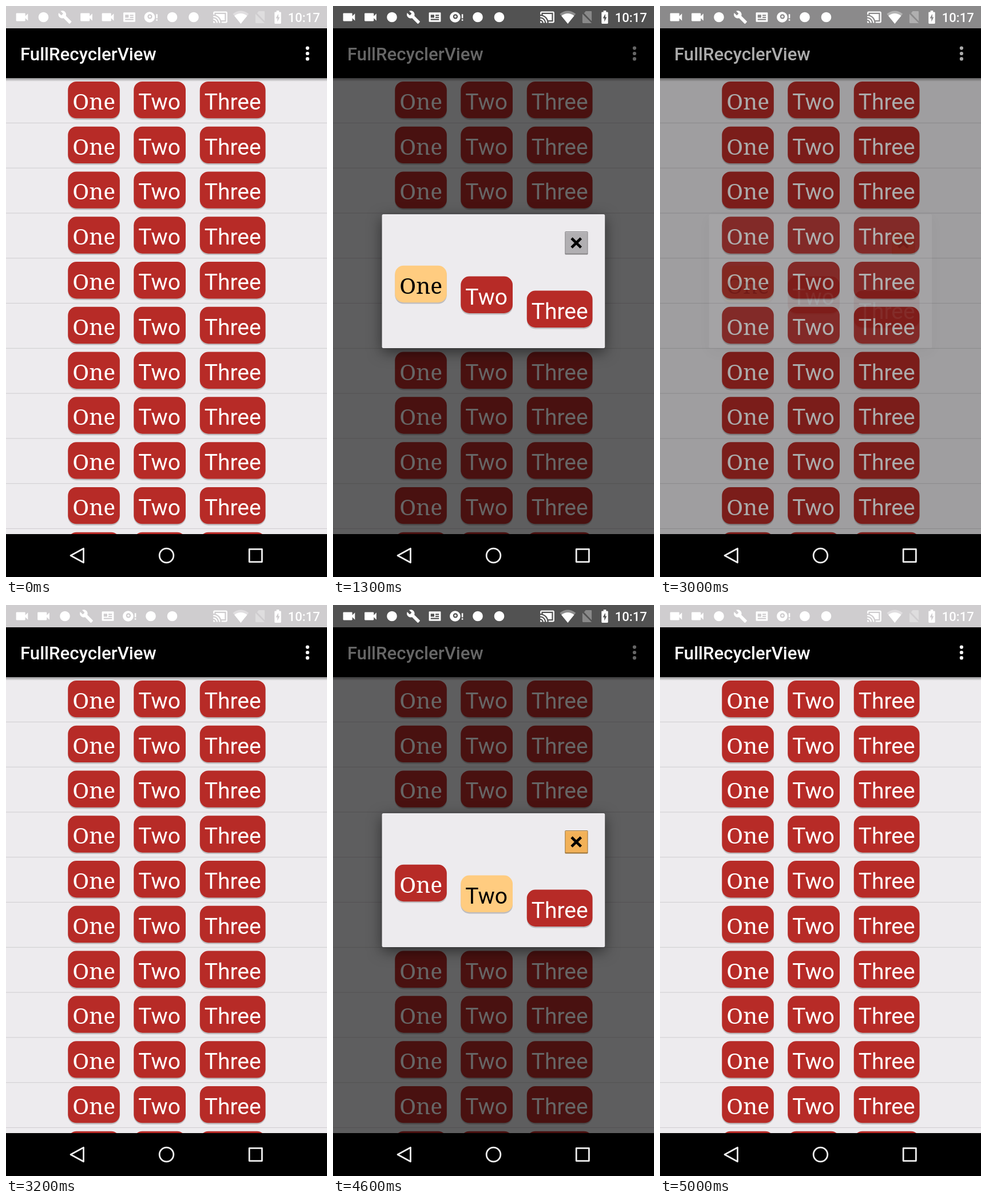
Write an HTML page with a canvas that moves like this. It is 561 px wide and 998 px high and loops after 5100 ms.

```html
<!DOCTYPE html>
<html lang="en">
<head>
<meta charset="utf-8">
<title>FullRecyclerView</title>
<style>
html, body { margin: 0; width: 100%; height: 100%; overflow: hidden; background: #000; }
canvas { display: block; }
</style>
</head>
<body>
<canvas id="stage" width="561" height="998"></canvas>
<script>
const W = 561, H = 998, LOOP = 5100, STEP = 100;
const BAR_TOP = 39, LIST_TOP = 126, NAV_TOP = 923, PITCH = 78.78;
const SANS = 'Roboto, sans-serif', SERIF = '"Noto Serif", serif';
const RED = '#b72b27', DARK_RED = '#781b1a', AMBER = '#ffcc80', PAPER = '#edebee';

const view = document.getElementById('stage').getContext('2d');
const layerCanvas = document.createElement('canvas');
layerCanvas.width = W;
layerCanvas.height = H;
const layer = layerCanvas.getContext('2d');

const BUTTONS = [
  { label: 'One', x: 108.3, w: 90.5, font: SERIF, drop: 454 },
  { label: 'Two', x: 223.3, w: 90.7, font: SANS, drop: 472.8 },
  { label: 'Three', x: 338.8, w: 114.7, font: SANS, drop: 497.8 }
];

// Each visit: button pressed, dialog opening, close button pressed, dialog leaving
const VISITS = [
  { pick: 0, press: 600, open: 636, close: 2900, leave: 2910 },
  { pick: 1, press: 3800, open: 3800, close: 4600, leave: 4610 }
];
const PRESSED_ROW = 3, DIM = 0.6, DIM_MS = 200, FADE_MS = 150;

const PATHS = {
  camera: 'M17 10.5V7c0-.55-.45-1-1-1H4c-.55 0-1 .45-1 1v10c0 .55.45 1 1 1h12c.55 0 1-.45 1-1v-3.5l4 4v-11l-4 4z',
  wrench: 'M22.7 19l-9.1-9.1c.9-2.3.4-5-1.5-6.9-2-2-5-2.4-7.4-1.3L9 6 6 9 1.6 4.7C.4 7.1.9 10.1 2.9 12.1c1.9 1.9 4.6 2.4 6.9 1.5l9.1 9.1c.4.4 1 .4 1.4 0l2.3-2.3c.5-.4.5-1.1.1-1.4z',
  card: 'M3 4h18q1 0 1 1v14q0 1-1 1H3q-1 0-1-1V5q0-1 1-1zM5 8v5h6V8zM13 8v2h6V8zM13 11.5v2h6v-2zM5 15v2h14v-2z',
  disc: 'M1 12a9 9 0 1 0 18 0a9 9 0 1 0-18 0zM6.5 11a4 4 0 1 0 8 0a4 4 0 1 0-8 0zM8.7 11a1.8 1.8 0 1 0 3.6 0a1.8 1.8 0 1 0-3.6 0zM21 7h2.4v7H21zM21 15.5h2.4v2.4H21z',
  dot: 'M3.5 12a8.5 8.5 0 1 0 17 0a8.5 8.5 0 1 0-17 0z',
  cast: 'M1 18v3h3c0-1.66-1.34-3-3-3zm0-4v2c2.76 0 5 2.24 5 5h2c0-3.87-3.13-7-7-7zm0-4v2c4.97 0 9 4.03 9 9h2c0-6.08-4.93-11-11-11zm20-7H3c-1.1 0-2 .9-2 2v3h2V5h18v14h-7v2h7c1.1 0 2-.9 2-2V5c0-1.1-.9-2-2-2zM19 7H5v1.63c3.96 1.28 7.09 4.41 8.37 8.37H19z',
  wifi: 'M12 22L0 7Q12-2 24 7z',
  sim: 'M10 3h8q1 0 1 1v14L7.5 6zM5 7l14 14H6q-1 0-1-1z',
  battery: 'M10 2h4v2h2q1 0 1 1v16q0 1-1 1H8q-1 0-1-1V5q0-1 1-1h2zM12.8 7L9 13.8h2.4V19l3.6-7h-2.2z'
};
for (const name in PATHS) PATHS[name] = new Path2D(PATHS[name]);

const EARLY = ['camera', 'dot', 'wrench', 'camera', 'camera', 'card', 'disc', 'dot', 'dot'];
const LATER = ['camera', 'camera', 'dot', 'wrench', 'card', 'disc', 'dot', 'dot'];

const clamp = v => Math.min(1, Math.max(0, v));
const easeOut = v => 1 - (1 - clamp(v)) ** 3;

function box(c, x, y, w, h, r, fill) {
  c.fillStyle = fill;
  c.beginPath();
  c.roundRect(x, y, w, h, r);
  c.fill();
}

function text(c, str, x, y, font, color) {
  c.font = font;
  c.fillStyle = color;
  c.fillText(str, x, y);
}

function icon(c, name, x, y, scale, alpha = 1) {
  c.save();
  c.globalAlpha = alpha;
  c.fillStyle = '#fff';
  c.translate(x, y);
  c.scale(scale, scale);
  c.translate(-12, -12);
  c.fill(PATHS[name], 'evenodd');
  c.restore();
}

function button(c, b, y, fill, ink) {
  box(c, b.x, y + 2.6, b.w, 64.2, 15, 'rgba(0,0,0,.2)');
  box(c, b.x, y, b.w, 64.4, 15, fill);
  text(c, b.label, b.x + 7.9, y + 49, '39px ' + b.font, ink);
}

function drawList(c, pressed) {
  c.fillStyle = PAPER;
  c.fillRect(0, LIST_TOP, W, NAV_TOP - LIST_TOP);
  for (let row = 0; row <= 10; row++) {
    const top = LIST_TOP + row * PITCH;
    BUTTONS.forEach((b, i) => {
      const down = row === PRESSED_ROW && i === pressed;
      button(c, b, top + 5.9, down ? DARK_RED : RED, '#fff');
    });
    c.fillStyle = '#d1cfd2';
    c.fillRect(0, top + PITCH - 0.9, W, 1.1);
  }
}

function drawBars(c) {
  c.fillStyle = '#cfcdcf';
  c.fillRect(0, 0, W, BAR_TOP);
  c.fillStyle = '#000';
  c.fillRect(0, BAR_TOP, W, LIST_TOP - BAR_TOP);
  const shade = c.createLinearGradient(0, LIST_TOP, 0, LIST_TOP + 6);
  shade.addColorStop(0, 'rgba(0,0,0,.38)');
  shade.addColorStop(1, 'rgba(0,0,0,0)');
  c.fillStyle = shade;
  c.fillRect(0, LIST_TOP, W, 6);
  text(c, 'FullRecyclerView', 25, 95, '500 31.2px ' + SANS, '#fff');
  for (const y of [73.6, 83, 92.4]) box(c, 523.8, y - 3.1, 6.2, 6.2, 3.1, '#fff');
}

function drawStatus(c, icons) {
  icons.forEach((name, i) => icon(c, name, 28 + i * 37.5, 19.5, name === 'camera' ? 1.15 : 1.04));
  icon(c, 'cast', 374.5, 19.5, 1.12);
  icon(c, 'wifi', 410.3, 19.5, 1.16, 0.35);
  c.save();
  c.translate(410.3, 31.1);
  c.scale(0.8, 0.8);
  icon(c, 'wifi', 0, -11.6, 1.16);
  c.restore();
  icon(c, 'sim', 444, 19.5, 1.16, 0.32);
  icon(c, 'battery', 475, 19.5, 1.14);
  text(c, '10:17', 492.8, 28, '500 22px ' + SANS, '#fff');
}

function drawNav(c) {
  c.fillStyle = '#000';
  c.fillRect(0, NAV_TOP, W, H - NAV_TOP);
  c.strokeStyle = '#eee';
  c.lineWidth = 2.8;
  c.lineJoin = 'round';
  c.beginPath();
  c.moveTo(113, 960.5);
  c.lineTo(135.5, 948.2);
  c.lineTo(135.5, 972.8);
  c.closePath();
  c.stroke();
  c.beginPath();
  c.arc(280.5, 960.5, 12.3, 0, Math.PI * 2);
  c.stroke();
  c.strokeRect(425.2, 949.4, 22.2, 22.2);
}

function drawClose(c, hot) {
  box(c, 405.3, 394, 40.2, 40.4, 1.5, hot ? '#9a7238' : '#858386');
  box(c, 406.3, 395, 38.2, 37.6, 1, hot ? '#f2b158' : '#b1afb2');
  c.fillStyle = hot ? '#f6c27a' : '#c4c2c5';
  c.fillRect(406.3, 395, 38.2, 1.2);
  c.strokeStyle = '#000';
  c.lineWidth = 4.6;
  c.beginPath();
  c.moveTo(417, 406);
  c.lineTo(433.4, 422.2);
  c.moveTo(433.4, 406);
  c.lineTo(417, 422.2);
  c.stroke();
}

function drawDialog(c, pick, hot) {
  c.clearRect(0, 0, W, H);
  c.save();
  c.shadowColor = 'rgba(0,0,0,.5)';
  c.shadowBlur = 24;
  c.shadowOffsetY = 7;
  box(c, 85.6, 364, 389.6, 234, 2.5, PAPER);
  c.restore();
  drawClose(c, hot);
  BUTTONS.forEach((b, i) => {
    const on = i === pick;
    button(c, b, b.drop - 0.2, on ? AMBER : RED, on ? '#000' : '#fff');
  });
}

function draw(t) {
  const c = view;
  const down = VISITS.find(v => t >= v.press && t < v.press + STEP);
  drawList(c, down ? down.pick : -1);
  drawBars(c);

  const visit = VISITS.find(v => t > v.open && t < v.leave + DIM_MS);
  if (visit) {
    const gone = t - visit.leave, shown = t - visit.open;
    const dim = DIM * (clamp(shown / DIM_MS) - clamp(gone / DIM_MS));
    c.fillStyle = `rgba(0,0,0,${dim})`;
    c.fillRect(0, 0, W, NAV_TOP);
    drawDialog(layer, visit.pick, t >= visit.close);
    c.globalAlpha = easeOut(shown / FADE_MS) * (1 - easeOut(gone / FADE_MS));
    c.drawImage(layerCanvas, 0, 0);
    c.globalAlpha = 1;
  }

  drawStatus(c, t < STEP ? EARLY : LATER);
  drawNav(c);
}

const start = performance.now();
let last = -1;
function tick() {
  const t = Math.floor(((performance.now() - start) % LOOP) / STEP) * STEP;
  if (t !== last) draw(last = t);
  requestAnimationFrame(tick);
}
tick();
</script>
</body>
</html>
```
